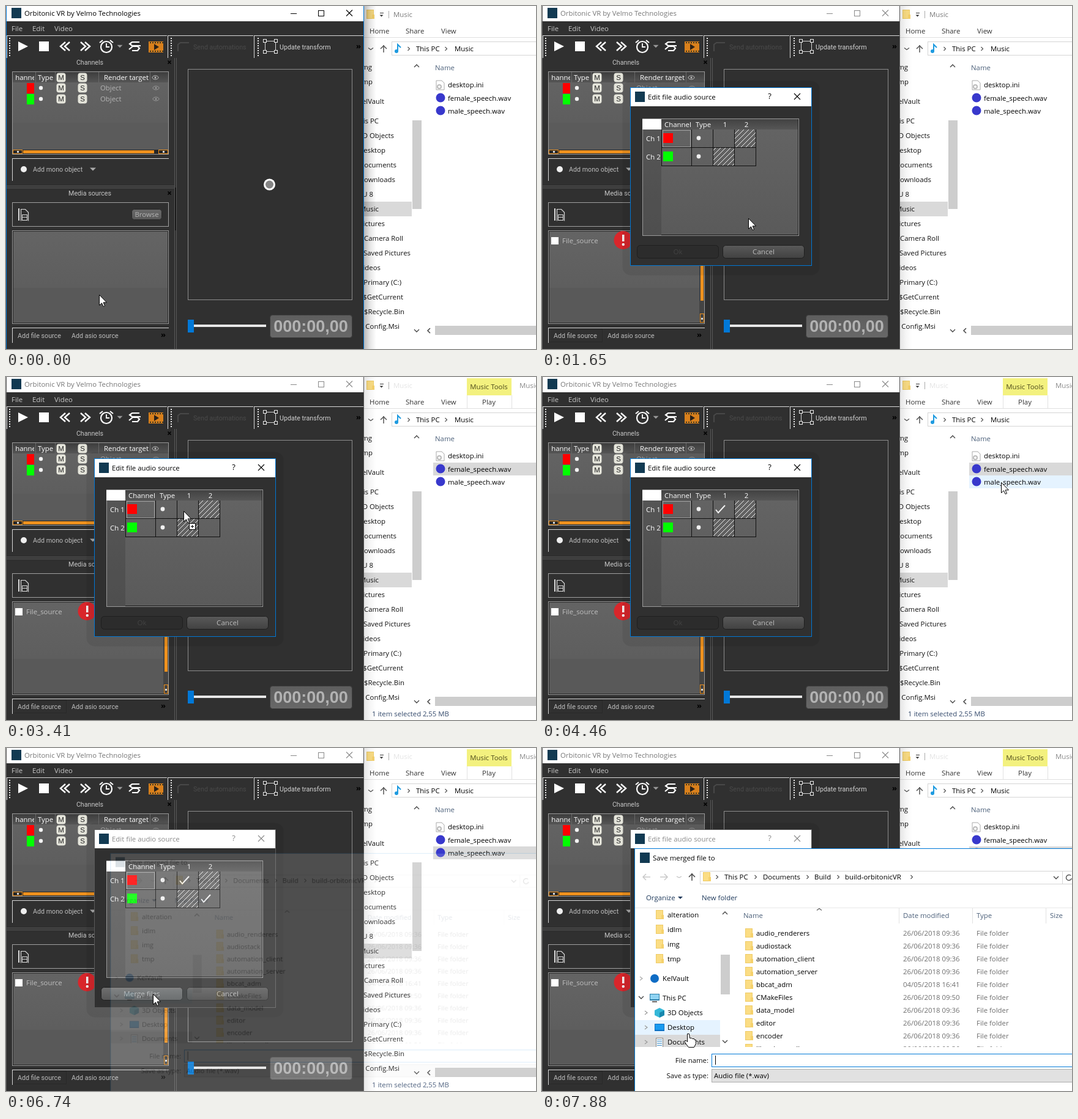
Animation, 866 px wide and 561 px high, one loop 7.99 s. Source, as an HTML page with a canvas:

```html
<!DOCTYPE html>
<html lang="en">
<head>
<meta charset="utf-8">
<title>Merging audio files</title>
<style>
html, body { margin: 0; width: 100%; height: 100%; overflow: hidden; background: #fff; }
canvas { display: block; }
</style>
</head>
<body>
<canvas id="stage" width="866" height="561"></canvas>
<script>
const LOOP = 7990, TICKS = 77;
const UI = '"Open Sans", "Noto Sans", sans-serif';
const APP = 'Roboto, "Open Sans", sans-serif';
const BLUE = '#0078d7', ORANGE = '#f0921e', DARK = '#303030', LOGO = '#123a52';

const main = document.getElementById('stage').getContext('2d');
const sheet = document.createElement('canvas');
sheet.width = 1100;
sheet.height = 700;
let g = main;

// ---- drawing helpers ----
function rect(x, y, w, h, fill) { g.fillStyle = fill; g.fillRect(x, y, w, h); }
function frame(x, y, w, h, color) {
  g.strokeStyle = color; g.lineWidth = 1;
  g.strokeRect(x + .5, y + .5, w - 1, h - 1);
}
function round(x, y, w, h, r, fill, edge) {
  g.beginPath(); g.roundRect(x + .5, y + .5, w - 1, h - 1, r);
  if (fill) { g.fillStyle = fill; g.fill(); }
  if (edge) { g.strokeStyle = edge; g.lineWidth = 1; g.stroke(); }
}
function disc(x, y, r, fill) {
  g.beginPath(); g.arc(x, y, r, 0, 7); g.fillStyle = fill; g.fill();
}
function trace(x, y, pts) {
  g.beginPath();
  for (let i = 0; i < pts.length; i += 2) g.lineTo(x + pts[i], y + pts[i + 1]);
}
function line(x, y, color, width, ...pts) {
  trace(x, y, pts); g.strokeStyle = color; g.lineWidth = width; g.stroke();
}
function poly(x, y, color, ...pts) { trace(x, y, pts); g.closePath(); g.fillStyle = color; g.fill(); }
function shade(y0, y1, a, b) {
  const s = g.createLinearGradient(0, y0, 0, y1);
  s.addColorStop(0, a); s.addColorStop(1, b);
  return s;
}
// y is the middle of the line of text
function text(s, x, y, color = '#000', align = 'left', font = '11.4px ' + UI) {
  g.font = font; g.textAlign = align; g.fillStyle = color;
  g.fillText(s, x, y + 4);
}
function label(s, x, y, color = '#bdbdbd', align) { text(s, x, y, color, align, '10.7px ' + APP); }
function clip(x, y, w, h, draw) {
  g.save(); g.beginPath(); g.rect(x, y, w, h); g.clip(); draw(); g.restore();
}
function fade(draw, alpha, scale, cx, cy) {
  if (alpha <= 0) return;
  if (alpha >= 1) return draw();
  const under = g;
  g = sheet.getContext('2d');
  g.clearRect(0, 0, 1100, 700);
  draw();
  g = under;
  g.save();
  g.globalAlpha = alpha;
  g.translate(cx, cy); g.scale(scale, scale); g.translate(-cx, -cy);
  g.drawImage(sheet, 0, 0);
  g.restore();
}

// ---- small parts ----
const chevron = (x, y, color, dx, dy) => dx
  ? line(x, y, color, 1.2, -dx, -3, dx, 0, -dx, 3)
  : line(x, y, color, 1.3, -4, -dy, 0, dy, 4, -dy);
const cross = (x, y, r, color, w) => {
  line(x, y, color, w, -r, -r, r, r);
  line(x, y, color, w, r, -r, -r, r);
};
const down = (x, y, w, color) => poly(x, y, color, -w, -w / 2, w, -w / 2, 0, w / 2);
const grip = x => { for (let y = 52; y < 83; y += 4) rect(x, y, 2, 2, '#e8e8e8'); };
function group(x, y, w, h) {
  rect(x, y, w, 1, '#d8d8d8'); rect(x, y, 1, h, '#d8d8d8');
}
function folder(x, y) {
  rect(x, y - 8, 12, 15, '#fbdd84'); frame(x, y - 8, 12, 15, '#eecb66'); rect(x + 9, y, 4, 7, '#f5d16c');
}
function eye(x, y, color) {
  g.beginPath(); g.ellipse(x, y, 5, 3, 0, 0, 7);
  g.strokeStyle = color; g.lineWidth = 1; g.stroke();
  disc(x, y, 1.5, color);
}
function badge(s, x, y) {
  round(x - 8, y - 8, 16, 16, 4, '#e4e4da');
  text(s, x, y, '#222', 'center', '11.5px "Liberation Sans", sans-serif');
}
function button(s, x, y, w, h, on, hot) {
  round(x, y, w, h, 5, on ? shade(y, y + h, hot ? '#707070' : '#5a5a5a', hot ? '#575757' : '#414141') : '#2c2c2c', '#1f1f1f');
  text(s, x + w / 2, y + h / 2, on ? '#bcbcbc' : '#434343', 'center', '11.6px ' + UI);
}
function tick(x, y) { line(x, y, '#f2f2f2', 2, 0, 7, 4, 12, 15, 0); }
function panel(x, y, w, h) {
  rect(x, y, w, h, shade(y, y + h, '#646464', '#5a5a5a'));
  frame(x, y, w, h, '#9a9a9a');
}

// ---- main window ----
function toolbar() {
  group(1, 48, 262, 37); group(264, 48, 140, 37); group(405, 48, 179, 37);
  grip(5); grip(269); grip(411);
  poly(20, 58, '#fff', 0, 0, 16, 8, 0, 16);
  rect(54, 58, 16, 16, '#fff');
  for (const [x, d] of [[93, -1], [126, 1]])
    for (const k of [0, 7]) line(x + k, 66, '#fff', 2.4, -4 * d, -7, 4 * d, 0, -4 * d, 7);
  g.strokeStyle = '#fff'; g.lineWidth = 2.2;
  g.beginPath(); g.arc(164, 67, 9, 0, 7); g.stroke();
  line(164, 67, '#fff', 1.8, 0, -6, 0, 0, 5, 0);
  line(164, 67, '#fff', 2, -11, -7, -6, -11);
  line(164, 67, '#fff', 2, 11, -7, 6, -11);
  down(186, 66, 4.5, '#999');
  line(210, 66, '#fff', 2.2, 8, -7, -4, -7, -8, -4, -4, -1, 10, -1);
  line(210, 66, '#fff', 2.2, -9, 5, -3, 0, 5, 0, 8, 3, 5, 7, -4, 7);
  rect(233, 58, 24, 18, '#d9801c');
  for (let x = 235; x < 256; x += 4) { rect(x, 59, 2, 2, '#332'); rect(x, 73, 2, 2, '#332'); }
  poly(242, 62, '#2b2118', 0, 0, 8, 5, 0, 10);
  line(281, 60, '#484848', 2, 0, 14, 0, 3, 4, 0, 18, 0);
  label('Send automations', 306, 67, '#4a4a4a');
  frame(423, 57, 18, 18, '#d5d5d5');
  for (const x of [420, 438]) for (const y of [54, 72]) { rect(x, y, 6, 6, DARK); frame(x, y, 6, 6, '#eee'); }
  label('Update transform', 447, 67, '#d2d2d2');
  text('»', 572, 66, '#000', 'left', 'bold 13px ' + UI);
}

function channels() {
  label('Channels', 137, 92, '#c6c6c6', 'center');
  cross(267, 92, 2.5, '#000', 1.6);
  panel(10, 107, 256, 136);
  rect(11, 191, 254, 44, '#5b5b5b');
  rect(11, 108, 254, 17, shade(108, 125, '#3d3d3d', '#555'));
  for (const x of [48, 80, 151, 235]) rect(x, 108, 1, 17, '#686868');
  clip(16, 108, 30, 17, () => text('Channel', 8, 117, '#fff'));
  text('Type', 52, 117, '#fff');
  text('Render target', 160, 117, '#fff');
  eye(244, 117, '#bbb');
  ['#f00', '#0f0'].forEach((color, i) => {
    const y = 134 + 18 * i;
    rect(34, y - 8, 12, 17, color);
    disc(57, y, 3.2, '#f2f2f2');
    text('Object', 154, y, '#b4b4b4');
    eye(245, y, '#999');
  });
  for (const y of [117, 134, 152]) { badge('M', 90, y); badge('S', 125, y); }
  rect(11, 235, 254, 7, '#262626');
  rect(28, 236, 214, 5, ORANGE);
  for (const x of [11, 249]) { frame(x, 235, 16, 7, ORANGE); rect(x + 7, 237, 3, 3, '#ddd'); }
  group(10, 249, 256, 37);
  disc(29, 267, 5, '#efefef');
  label('Add mono object', 44, 267);
  down(142, 267, 5, '#aaa');
}

function media(added, hot) {
  rect(1, 294, 275, 1, '#5a5a5a'); rect(1, 297, 275, 1, '#5a5a5a');
  label('Media sources', 137, 306, '#c6c6c6', 'center');
  cross(267, 306, 2.5, '#000', 1.6);
  frame(10, 321, 256, 40, '#a0a0a0');
  rect(20, 331, 2, 20, '#dcdcdc');
  line(24.5, 332.5, '#dcdcdc', 1.2, 0, 19, 0, 0, 7, 0, 12, 5, 12, 19);
  frame(26, 341, 9, 10, '#dcdcdc'); rect(27, 345, 7, 1, '#dcdcdc');
  round(205, 332, 50, 18, 4, shade(332, 350, '#6a6a6a', '#585858'), '#262626');
  text('Browse', 230, 341, '#b4b4b4', 'center');
  panel(10, 367, 256, 153);
  frame(11, 368, 254, 151, '#222');
  rect(12, 461, 252, 57, '#595959');
  if (added) {
    rect(15, 378, 12, 12, '#fff');
    text('File_source', 33, 384, '#c0c0c0');
    disc(132.5, 383, 15, '#d9262b');
    rect(131, 374, 3.5, 11, '#fff'); disc(132.8, 390, 2.2, '#fff');
    rect(257, 369, 8, 149, '#444');
    rect(259, 385, 5, 97, ORANGE);
    frame(258, 503, 7, 15, ORANGE); rect(260, 510, 3, 3, '#ddd');
  }
  group(10, 526, 256, 25);
  if (hot) frame(11, 528, 88, 22, '#292929');
  label('Add file source', 19, 539);
  label('Add asio source', 107, 539);
  text('»', 253, 538, '#000', 'left', 'bold 13px ' + UI);
}

function windowView(active, added, hot) {
  rect(0, 0, 585, 561, DARK);
  rect(0, 0, 585, 25, '#fff');
  rect(9, 3, 16, 17, LOGO);
  const ink = active ? '#000' : '#8a8a8a';
  text('Orbitonic VR by Velmo Technologies', 30, 12, active ? '#000' : '#777');
  rect(465, 12, 10, 1, ink); frame(510, 7, 10, 10, ink); cross(561, 11.5, 5, ink, 1.1);
  text('File', 9, 37, '#c8c8c8'); text('Edit', 43, 37, '#c8c8c8'); text('Video', 79, 37, '#c8c8c8');
  toolbar();
  channels();
  media(added, hot);
  rect(275, 85, 1, 476, '#585858'); rect(278, 85, 1, 476, '#585858');
  rect(276, 297, 2, 70, '#161616');
  frame(297, 103, 269, 378, '#8c8c8c');
  disc(430.5, 292, 9.5, '#fff'); disc(430.5, 292, 6.5, '#858585');
  rect(307, 521, 118, 4, '#e6e6e6');
  rect(297, 513, 10, 21, BLUE);
  round(431, 505, 135, 38, 4, shade(505, 543, '#5e5e5e', '#686868'), '#3c3c3c');
  text('000:00,00', 498, 529, '#b2b2b2', 'center', 'bold 27px "Liberation Sans", Arial, sans-serif');
  rect(0, 0, 1, 561, active ? BLUE : '#555');
  rect(584, 0, 1, 561, active ? BLUE : '#555');
}

// ---- file browser ----
function browser(s) {
  rect(585, 0, 281, 561, '#fff');
  folder(589, 14);
  rect(611, 11, 6, 1, '#333'); down(613.5, 16, 3, '#333');
  rect(625, 8, 1, 12, '#aaa');
  text('Music', 633, 14, s.tools ? '#e4e4e4' : '#7b7b7b');
  if (s.tools) {
    rect(753, 2, 73, 28, '#f3f17f');
    rect(753, 30, 1, 21, '#e2e2e2'); rect(826, 30, 1, 21, '#e2e2e2');
    text('Music Tools', 789, 16, '#4d4a1b', 'center');
    text('Play', 789, 41, '#333', 'center');
    text('Music', 839, 14, '#8a8a8a');
    text('1 item selected', 598, 551, '#33496b'); text('2,55 MB', 681, 551, '#33496b');
  }
  text('Home', 594, 41, '#333'); text('Share', 653, 41, '#333'); text('View', 711, 41, '#333');
  rect(585, 51, 281, 1, '#e0e0e0');
  chevron(596, 70, '#555', 0, 1.5);
  line(617, 70, '#555', 1.5, 0, 6, 0, -6); line(617, 65, '#555', 1.5, -5, 5, 0, 0, 5, 5);
  frame(630, 58, 240, 23, '#d5d5d5');
  disc(638, 74, 3, '#1e9be0'); line(640, 63, '#1e9be0', 2, 0, 11, 0, 0, 5, 5);
  chevron(658, 70, '#555', 1.5); text('This PC', 670, 70);
  chevron(719, 70, '#555', 1.5); text('Music', 733, 70);
  rect(585, 320, 78, 24, '#d9d9d9');
  const places = [['img', 598, 100], ['tmp', 599, 124], ['KelVault', 618, 156], ['This PC', 609, 188]];
  const more = [['3D Objects', 634], ['Desktop', 620], ['Documents', 638], ['Downloads', 636], ['ZU 8', 600],
    ['Music', 609], ['Pictures', 619], ['Camera Roll', 649], ['Saved Pictures', 661], ['Videos', 612],
    ['Primary (C:)', 646], ['$GetCurrent', 649], ['$Recycle.Bin', 651], ['Config.Msi', 643]];
  more.forEach(([name, x], i) => places.push([name, x, 212 + 24 * i]));
  clip(585, 85, 78, 460, () => places.forEach(([name, x, y]) => text(name, x, y, '#111', 'right')));
  chevron(671, 98, '#444', 0, -2); chevron(671, 531, '#444', 0, 2);
  rect(664, 187, 15, 145, '#cdcdcd');
  text('Name', 701, 101, '#4c607a');
  for (const [y, sel, hot] of [[151, s.first, s.hot1], [172, s.second, s.hot2]])
    if (sel || hot) rect(698, y - 11, 168, 21, sel ? '#d9d9d9' : '#e5f3ff');
  line(703, 122, '#aaa', 1, 0, 0, 9, 0, 13, 4, 13, 15, 0, 15, 0, 0);
  g.strokeStyle = '#bbb'; g.lineWidth = 2; g.beginPath(); g.arc(708, 132, 3, 0, 7); g.stroke();
  text('desktop.ini', 722, 129);
  disc(710, 150, 7.5, '#3838cc'); text('female_speech.wav', 722, 151);
  disc(710, 171, 7.5, '#3838cc'); text('male_speech.wav', 722, 172);
  line(691, 531, '#444', 1.5, 2, -4, -2, 0, 2, 4);
  rect(701, 523, 165, 15, '#cdcdcd');
  const edge = g.createLinearGradient(585, 0, 605, 0), a = s.shadow;
  edge.addColorStop(0, `rgba(0,0,0,${a})`); edge.addColorStop(.5, `rgba(0,0,0,${a * .35})`);
  edge.addColorStop(1, 'rgba(0,0,0,0)');
  rect(585, 0, 20, 561, edge);
}

// ---- dialogs ----
// diagonal pattern repeating every 8 px, anchored to the stage
function hatch(x, y, w, h) {
  clip(x, y, w, h, () => {
    for (let sum = Math.ceil((x + y) / 8) * 8 + 4; sum < x + y + w + h; sum += 8)
      line(sum - y - h, y + h, '#f0f0f0', 1, 0, 0, h, -h);
  });
}

function editDialog(s) {
  round(131, 122, 323, 319, 14, 'rgba(0,0,0,.08)');
  rect(144, 133, 297, 292, DARK);
  rect(144, 133, 297, 31, '#fff');
  rect(152, 140, 16, 17, LOGO);
  const ink = s.idle ? '#8a8a8a' : '#000';
  text('Edit file audio source', 173, 149, ink);
  text('?', 372, 148, ink, 'center', '13px ' + UI);
  cross(417, 148, 5, ink, 1.1);
  panel(164, 184, 256, 192);
  rect(165, 185, 254, 17, shade(185, 202, '#424242', '#565656'));
  rect(165, 202, 30, 173, 'rgba(30,30,30,.2)');
  rect(164, 185, 31, 17, '#fff');
  rect(195, 374, 224, 1, '#111'); rect(418, 185, 1, 190, '#222');
  text('Channel', 200, 194, '#fff'); text('Type', 251, 194, '#fff');
  text('1', 299, 194, '#fff', 'center'); text('2', 334, 194, '#fff', 'center');
  ['#f00', '#0f0'].forEach((color, i) => {
    const y = 202 + 30 * i;
    text('Ch ' + (i + 1), 170, y + 15, '#fff');
    rect(198, y + 6, 16, 16, color);
    disc(256, y + 14, 3.4, '#f0f0f0');
    hatch(315 - 35 * i, y, 34, 29);
    rect(195, y + 29, 155, 1, '#111');
    if (s.ticks[i]) tick(284 + 35 * i, y + 8);
  });
  for (const x of [195, 244, 279, 314, 349]) rect(x, 202, 1, 60, '#111');
  g.setLineDash([1, 1]); frame(197, 203, 46, 28, '#ddd'); g.setLineDash([]);
  button(s.ticks[1] ? 'Merge files' : 'Ok', 155, 391, 134, 22, s.ticks[1], s.hot);
  button('Cancel', 295, 391, 134, 22, true);
  frame(144, 133, 297, 292, s.idle ? '#5a5a5a' : BLUE);
}

function saveDialog(hotY) {
  rect(152, 164, 900, 480, '#fff');
  rect(160, 171, 16, 17, LOGO);
  text('Save merged file to', 181, 180);
  for (const [x, d] of [[171, -1], [199, 1]]) {
    line(x, 211, '#c4c4c4', 1.4, -6, 0, 6, 0);
    line(x + 6 * d, 211, '#c4c4c4', 1.4, -5 * d, -5, 0, 0, -5 * d, 5);
  }
  chevron(224, 211, '#c4c4c4', 0, 1);
  line(245, 211, '#444', 1.5, 0, 6, 0, -6); line(245, 206, '#444', 1.5, -5, 5, 0, 0, 5, 5);
  frame(258, 201, 593, 22, '#d5d5d5'); frame(850, 201, 200, 22, '#d5d5d5');
  folder(263, 211);
  for (const x of [286, 349, 434, 484, 604]) chevron(x, 211, '#555', 1.5);
  text('This PC', 298, 211); text('Documents', 361, 211); text('Build', 445, 211);
  text('build-orbitonicVR', 495, 211);
  chevron(840, 212, '#444', 0, 2);
  g.strokeStyle = '#555'; g.lineWidth = 1.4; g.beginPath(); g.arc(861, 212, 4.5, .3, 5.5); g.stroke();
  text('Organize', 170, 245, '#1e395b'); down(226, 245, 4, '#1e395b');
  text('New folder', 261, 245, '#1e395b');
  rect(152, 261, 900, 1, '#e8e8e8');

  const row = Math.floor((hotY - 397) / 24);
  clip(152, 262, 140, 227, () => {
    if (row >= 0 && row < 3) rect(152, 397 + 24 * row, 139, 24, '#e5f3ff');
    rect(152, 469, 139, 24, '#d9d9d9');
    ['alteration', 'idlm', 'img', 'tmp'].forEach((name, i) => {
      folder(186, 273 + 24 * i); text(name, 205, 273 + 24 * i);
    });
    chevron(162, 377, '#aaa', 2); disc(184, 377, 7, '#0f6cc4'); text('KelVault', 197, 377);
    chevron(162, 408, '#444', 0, 2);
    rect(176, 402, 16, 11, '#2d7ea8'); rect(177, 403, 14, 8, '#8fd3f2'); rect(180, 414, 8, 2, '#666');
    text('This PC', 197, 409);
    ['3D Objects', 'Desktop', 'Documents'].forEach((name, i) => {
      chevron(170, 433 + 24 * i, '#999', 2); text(name, 205, 433 + 24 * i);
    });
    poly(192, 433, '#35b8d8', -8, -4, 0, -8, 8, -4, 8, 4, 0, 8, -8, 4);
    poly(192, 433, '#1787ad', 0, 0, 8, -4, 8, 4, 0, 8);
    rect(184, 451, 16, 12, '#0b6fc2'); rect(185, 452, 14, 9, '#199bf0');
    rect(186, 474, 12, 16, '#fff'); frame(186, 474, 12, 16, '#888');
    for (let y = 477; y < 487; y += 3) rect(188, y, 8, 1, '#3b8ec9');
  });
  chevron(299, 270, '#444', 0, -2); chevron(299, 480, '#444', 0, 2);
  rect(292, 338, 15, 65, '#cdcdcd');

  chevron(453, 264, '#666', 0, -1.5);
  [['Name', 329], ['Date modified', 590], ['Type', 710], ['Size', 830]].forEach(([s, x], i) => {
    text(s, x, 274, '#4c607a');
    if (i) rect(x - 7, 262, 1, 25, '#e2e2e2');
  });
  clip(308, 288, 740, 201, () => {
    ['audio_renderers', 'audiostack', 'automation_client', 'automation_server', 'bbcat_adm', 'CMakeFiles',
      'data_model', 'editor', 'encoder', 'libraries_audio'].forEach((name, i) => {
      const y = 303 + 21 * i;
      folder(332, y);
      text(name, 350, y);
      text(i === 4 ? '04/05/2018 16:41' : '26/06/2018 09:' + (i === 5 ? 50 : 36), 590, y, '#6d6d6d');
      text('File folder', 710, y, '#6d6d6d');
    });
  });
  text('File name:', 272, 511, '#111', 'right');
  frame(277, 500, 770, 22, BLUE);
  rect(283, 503, 1, 15, '#000');
  text('Save as type:', 272, 536, '#111', 'right');
  rect(277, 525, 770, 22, '#e1e1e1'); frame(277, 525, 770, 22, '#adadad');
  text('Audio file (*.wav)', 281, 536);
  rect(152, 164, 900, 1, BLUE); rect(151, 164, 1, 480, BLUE);
}

// ---- pointer ----
const path = [[0, 152, 472], [6, 62, 537], [10, 62, 537], [16, 337, 347], [23, 735, 150], [25, 735, 150],
  [32, 292, 214], [33, 290, 219], [35, 290, 219], [43, 750, 172], [44, 750, 172], [51, 329, 251],
  [52, 327, 249], [55, 327, 249], [58, 277, 368], [61, 240, 402], [69, 240, 402], [73, 236, 495], [76, 237, 467]];

function pointerAt(n) {
  const i = path.findIndex(p => p[0] >= n);
  if (i < 1) return path[i < 0 ? path.length - 1 : 0].slice(1);
  const [a, x0, y0] = path[i - 1], [b, x1, y1] = path[i];
  const p = (n - a) / (b - a), e = (p + p * p * (3 - 2 * p)) / 2;
  return [Math.round(x0 + (x1 - x0) * e), Math.round(y0 + (y1 - y0) * e)];
}

function pointer(x, y, hand, drag) {
  if (drag && x > 585) { g.globalAlpha = .5; disc(x, y - 45, 32, '#3838cc'); g.globalAlpha = 1; }
  const shape = hand
    ? [0, 0, 3, 0, 4, 7, 7, 7, 8, 8, 11, 8, 12, 10, 14, 10, 14, 16, 11, 22, 2, 22, -4, 14, -4, 11, -2, 11, 0, 13]
    : [0, 0, 0, 17, 4, 13.4, 6.6, 19, 9, 18, 6.6, 12.4, 12, 12.4];
  poly(x + .5, y + .5, '#fff', ...shape);
  g.strokeStyle = '#000'; g.lineWidth = 1; g.stroke();
  if (drag) {
    rect(x + 9, y + 20, 11, 11, '#fff'); frame(x + 9, y + 20, 11, 11, '#000');
    rect(x + 12, y + 25, 5, 1, '#000'); rect(x + 14, y + 23, 1, 5, '#000');
  }
}

function draw(n) {
  const [x, y] = pointerAt(n);
  const during = (a, b) => n >= a && n < b;
  browser({
    tools: n >= 25, first: during(25, 44), second: n >= 44,
    hot1: during(22, 25), hot2: during(42, 44), shadow: n < 10 ? .28 : .1
  });
  windowView(n < 10, n >= 10, n >= 9);
  const edit = { ticks: [n >= 34, n >= 54], idle: n >= 64, hot: n >= 60 };
  const opened = n < 10 ? 0 : [.35, .85][n - 10] || 1;
  fade(() => editDialog(edit), opened, n === 10 ? .95 : .99, 292, 279);
  const saved = n < 65 ? 0 : [.15, .7, .95][n - 65] || 1;
  fade(() => saveDialog(y), saved, [.957, .985, .997][n - 65] || 1, 600, 346);
  pointer(x, y, n >= 70 && y < 490, during(26, 34) || during(45, 54));
}

function loop(now) {
  const t = now % LOOP;
  draw(Math.min(TICKS - 1, Math.floor(t * TICKS / LOOP + .3)));
  requestAnimationFrame(loop);
}
draw(0);
requestAnimationFrame(loop);
</script>
</body>
</html>
```
